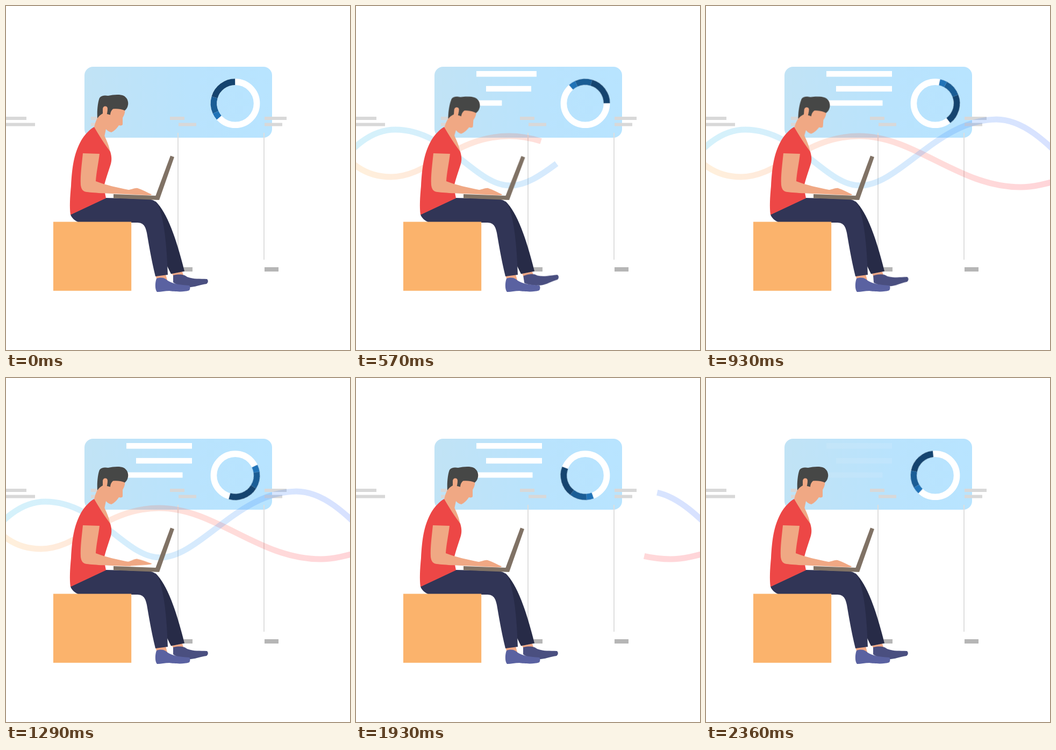
These frames come from a looping animation (640x640 px, 2430 ms). An HTML page:

```html
<!DOCTYPE html>
<html lang="en">
<head>
<meta charset="utf-8">
<title>Working on a laptop</title>
<style>
  html, body { margin: 0; width: 100%; height: 100%; overflow: hidden; background: #fff; }
  svg { display: block; width: 100vw; height: 100vh; }

  .ring, .head, .arm, .hand, .screen, .foot, .lines, .lines rect {
    animation: 2430ms linear infinite;
  }
  .lines rect { transform-box: fill-box; transform-origin: left; }
  .ring { transform-origin: 426.5px 181.2px; animation-name: spin; }
  .head { transform-origin: 157px 230px; animation-name: nod; }
  .arm { animation-name: shift; }
  .hand { transform-origin: 224px 346px; animation-name: type; }
  .screen { transform-origin: 282px 357px; animation-name: tilt; }
  .foot { transform-origin: 320px 500px; animation-name: tap; }
  .lines { animation-name: fade; }
  .lines .a { animation-name: growA; }
  .lines .b { animation-name: growB; }
  .lines .c { animation-name: growC; }

  @keyframes spin { to { transform: rotate(360deg); } }
  @keyframes growA { 0%, 8.3% { transform: scaleX(0); } 26.5%, 100% { transform: none; } }
  @keyframes growB { 0%, 11.1% { transform: scaleX(0); } 28.3%, 100% { transform: none; } }
  @keyframes growC { 0%, 12.6% { transform: scaleX(0); } 32.4%, 100% { transform: none; } }
  @keyframes fade { 0%, 86% { opacity: 1; } 100% { opacity: 0; } }
  @keyframes nod {
    0%, 53%, 100% { transform: rotate(0deg); animation-timing-function: ease-in-out; }
    12%, 41% { transform: rotate(4deg); animation-timing-function: ease-in-out; }
  }
  @keyframes shift {
    0%, 53%, 100% { transform: translateX(0); }
    12%, 41% { transform: translateX(.9px); }
  }
  @keyframes type {
    0%, 5%, 21%, 27%, 38%, 46%, 59%, 68%, 79.5%, 83%, 94%, 100% { transform: rotate(0deg); }
    13.2%, 32.5%, 52%, 73.5%, 89% { transform: rotate(-10deg); }
  }
  @keyframes tilt {
    0%, 38%, 100% { transform: rotate(0deg); }
    12%, 26% { transform: rotate(1.2deg); }
  }
  @keyframes tap {
    0%, 49%, 100% { transform: rotate(0deg); }
    13.2% { transform: rotate(-7deg); }
    22%, 27% { transform: rotate(-8.4deg); }
    39.7% { transform: rotate(-4.2deg); }
  }
</style>
</head>
<body>
<svg viewBox="0 0 640 640">
  <defs>
    <linearGradient id="sky">
      <stop offset="0" stop-color="#c1e3f5"/>
      <stop offset=".55" stop-color="#b9e3fd"/>
      <stop offset="1" stop-color="#b8e4ff"/>
    </linearGradient>
    <linearGradient id="cool" gradientUnits="userSpaceOnUse" x1="0" y1="0" x2="640" y2="0">
      <stop offset="0" stop-color="#2dbcea"/>
      <stop offset=".4" stop-color="#2fa5f2"/>
      <stop offset="1" stop-color="#3c6cff"/>
    </linearGradient>
    <linearGradient id="warm" gradientUnits="userSpaceOnUse" x1="0" y1="0" x2="640" y2="0">
      <stop offset="0" stop-color="#ffb450"/>
      <stop offset=".55" stop-color="#ff5a48"/>
      <stop offset="1" stop-color="#ff2d41"/>
    </linearGradient>
  </defs>

  <rect x="146" y="113" width="349" height="132" rx="16" fill="url(#sky)"/>
  <g class="lines" fill="#fff">
    <rect class="a" x="224" y="121" width="122" height="10.6"/>
    <rect class="b" x="242" y="148.8" width="104" height="10.4"/>
    <rect class="c" x="176" y="175.5" width="152.5" height="10"/>
  </g>
  <g fill="none" stroke-width="11.6">
    <circle cx="426.5" cy="181.2" r="40.1" stroke="#fff"/>
    <g class="ring">
      <circle cx="426.5" cy="181.2" r="40.1" pathLength="360" stroke="#15446f"
        stroke-dasharray="73 287" transform="rotate(-163.5 426.5 181.2)"/>
      <circle cx="426.5" cy="181.2" r="40.1" pathLength="360" stroke="#1a5d95"
        stroke-dasharray="41 319" transform="rotate(-204.5 426.5 181.2)"/>
      <circle cx="426.5" cy="181.2" r="40.1" pathLength="360" stroke="#2073b7"
        stroke-dasharray="17 343" transform="rotate(-221.5 426.5 181.2)"/>
    </g>
  </g>

  <path fill="#d8d8d8" d="M0 206h38v6H0zM0 217.5h54v6H0zM158 206h17v6h-17zM158 217.5h15v6h-15z
    M305 206h27v6h-27zM321 217.5h33v6h-33zM481 206h41v6h-41zM481 217.5h33v6h-33z"/>
  <path fill="#dedede" d="M319 236h2v236h-2zM479 236h2v236h-2z"/>
  <path fill="#b6b6b6" d="M320 486h27v8h-27zM481 486h26v8h-26z"/>

  <g fill="none" stroke-width="11" stroke-opacity=".2">
    <path id="warmWave" stroke="url(#warm)" d="M-40 255C-15 290 15 318 65 318C135 318 185 242 285 242
      C390 242 470 337 585 337C605 337 630 333 685 315"/>
    <path id="coolWave" stroke="url(#cool)" d="M-40 312C-12 262 30 230 73 230C170 230 220 334 287 334
      C360 334 432 211 540 211C590 211 630 250 685 305"/>
  </g>

  <!-- legs -->
  <path fill="#f0a884" d="M309 498L328 494L331 504L313 506z"/>
  <path class="foot" fill="#4a4f80" d="M311 501C325 498 332 500 337 504C350 509 360 507 374 508
    C377 511 376 515 373 517C360 519 350 523 343 523C330 523 315 518 311 514z"/>
  <path fill="#272b47" d="M278 363C300 385 316 430 332 493.500L307 498.500L296 476z"/>
  <path fill="#f0a884" d="M278 501L297 499L300 510L281 510z"/>
  <path fill="#5a62a1" d="M280 507C290 504 296 506 301 511C310 517 325 519 341 520C343 522 343 526 341 529
    C330 533 312 531 304 530C296 530 288 532 281 532C277 528 277 515 280 507z"/>
  <path fill="#313556" d="M120 388L186 357L262 359C275 360 281 364 284 372C294 400 299 440 301 500L278 503
    C270 470 266 445 262 422C259 407 254 403 243 403H137C128 400 122 394 120 388z"/>
  <rect x="88" y="401.500" width="145.200" height="128.300" fill="#fbb36c"/>

  <!-- head and torso -->
  <path fill="#f0a884" d="M164 225L183 241C188 252 192 260 194 273L180 262z"/>
  <g class="head">
    <path fill="#f0a884" d="M164 226C166 215 170 206 178 199L190 188L221 191C222 198 220 203 217 208V220
      C217 222 214 223 210 222C206 228 201 233 196 235C191 234 188 231 186 229L183 243L176 246z"/>
    <path fill="#464746" d="M170 209C169 195 171 178 174 171C178 166 184 166 190 167C200 165 212 164 219 167
      C226 171 228 178 227 184C226 189 224 192 221 194.500C214 191 206 191 199 191.500C196 194 194 198 194 202.500
      L188 201L180 200Q174 203 170 209z"/>
    <path fill="#f0a884" d="M180 202V192C180 185 189 185 189 191C189 196 188 200 187 204z"/>
  </g>
  <path fill="#ed4746" d="M164 225C172 239 184 258 194 271C197 281 197 288 194 297C188 315 184 327 182 337L186 357.500
    L120 388.500C118 375 119 355 121 335C123 300 126 275 140 250C146 240 155 230 164 225z"/>

  <g class="arm" fill="#f0a884">
    <path d="M143 274L174 275C172 292 168 310 167 326C185 333 208 338 228 342L232 350L222 350C195 349 165 348 150 346
      C143 345 140 341 139 333C138 315 141 295 143 274z"/>
    <path class="hand" d="M224 342.500C234 342 239 338 245 339C254 342 263 347 271 350.500C271 352 268 352 262 352L222 350z"/>
  </g>
  <g fill="#807265">
    <path d="M200 350L280 353L285 361L200 357.500z"/>
    <path class="screen" d="M306 278.500L313 281L285 361L278 354z"/>
  </g>
</svg>
<script>
  const LOOP = 2430, STEPS = 34;

  // Path length at which a left-to-right curve reaches x.
  function lengthAt(path, x) {
    let lo = 0, hi = path.getTotalLength();
    for (let i = 0; i < 24; i++) {
      const mid = (lo + hi) / 2;
      if (path.getPointAtLength(mid).x < x) lo = mid; else hi = mid;
    }
    return lo;
  }

  // Each stop is [step, tail x, head x].
  function sweep(id, stops) {
    const path = document.getElementById(id);
    const frames = stops.map(([step, tail, head]) => {
      const from = lengthAt(path, tail), to = lengthAt(path, head);
      return { offset: step / STEPS, strokeDasharray: `0px, ${from}px, ${to - from}px, 3000px` };
    });
    path.animate(frames, { duration: LOOP, iterations: Infinity });
  }

  sweep('coolWave', [
    [0, -40, -40], [3.3, -40, -40], [4.5, -40, 54], [8.5, -40, 373], [12, -40, 684],
    [20.6, -40, 684], [22.5, 130, 684], [27.5, 560, 684], [28.9, 684, 684], [34, 684, 684]
  ]);
  sweep('warmWave', [
    [0, -40, -40], [3.9, -40, -40], [4.5, -40, 11], [8.5, -40, 344], [12.5, -40, 684],
    [21, -40, 684], [22.5, 88, 684], [27.5, 536, 684], [29.1, 684, 684], [34, 684, 684]
  ]);

  // Hold each pose for one step; all but the first show the middle of their step.
  const anims = document.getAnimations();
  anims.forEach(a => a.pause());
  const start = performance.now();

  function draw(now) {
    const t = Math.max(0, now - start) % LOOP;
    const step = Math.floor((t + 5) / LOOP * STEPS) % STEPS;
    const pose = step ? (step + .5) / STEPS * LOOP : 0;
    anims.forEach(a => { a.currentTime = pose; });
    requestAnimationFrame(draw);
  }
  draw(start);
</script>
</body>
</html>
```
